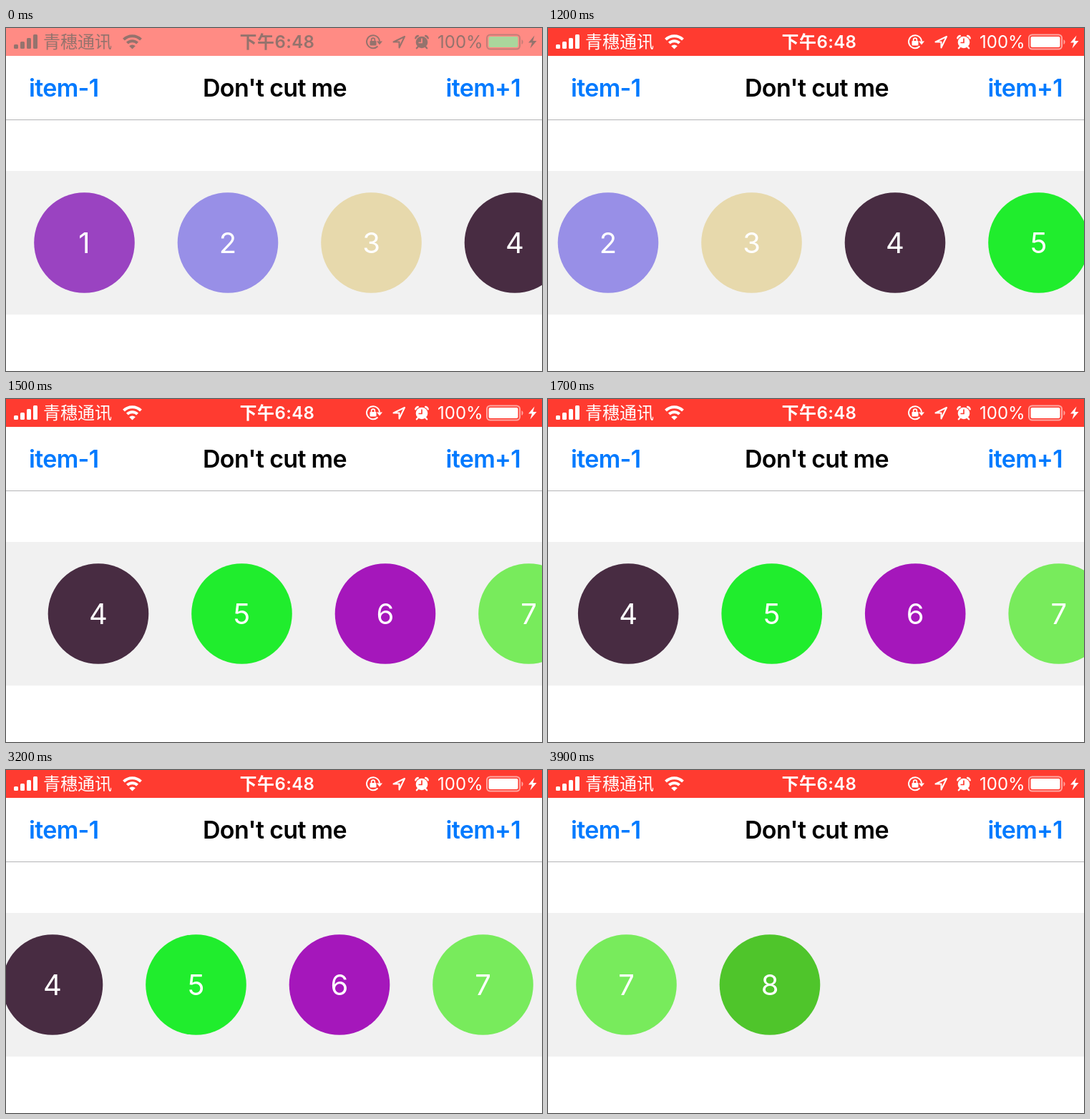
Animation of 749 by 480 pixels, one loop 4600 ms. Source, as an HTML page:

```html
<!DOCTYPE html>
<html lang="zh-CN">
<meta charset="utf-8">
<title>Paging list</title>
<style>
  html, body { margin: 0; width: 100%; height: 100%; overflow: hidden; background: #fff; }
  svg { display: block; width: 749px; height: 480px; font-family: Inter, "Noto Sans CJK SC", "Noto Sans CJK", sans-serif; }
  .bar { font-size: 24px; }
  .nav { font-size: 34px; font-weight: 600; letter-spacing: -.02em; }
  .line { fill: none; stroke: var(--ink); stroke-width: 2; }
  #status { fill: var(--ink); }
  #list text { font-size: 40px; fill: #fff; text-anchor: middle; }
</style>
<svg viewBox="0 0 749 480">
  <rect width="749" height="39" fill="var(--bar)"/>
  <g id="status">
    <!-- signal and carrier -->
    <rect x="11" y="23" width="6" height="6" rx="1.5"/>
    <rect x="20" y="19" width="6" height="10" rx="1.5"/>
    <rect x="29" y="14" width="6" height="15" rx="1.5"/>
    <rect x="38" y="9" width="6" height="20" rx="1.5"/>
    <text class="bar" x="52" y="28" font-weight="300">青穗通讯</text>
    <path class="line" style="stroke-width:4" d="M164.5 16.2A17 17 0 0 1 188.5 16.2M169.4 21.2A10 10 0 0 1 183.6 21.2"/>
    <path d="M176.5 29.5l-4.3-4.3a6.1 6.1 0 0 1 8.6 0z"/>
    <text class="bar" x="379" y="28" font-weight="600" text-anchor="middle" letter-spacing=".4">下午6:48</text>
    <!-- rotation lock -->
    <path class="line" d="M519.5 25.5A9 9 0 1 1 522 18.5"/>
    <path d="M518 18.5h8l-4 5z"/>
    <rect x="508.5" y="18" width="9" height="6.5" rx="1"/>
    <path class="line" style="stroke-width:1.6" d="M510.6 18.5v-2a2.4 2.4 0 0 1 4.8 0v2"/>
    <!-- location -->
    <path class="line" stroke-linejoin="round" d="M557 12L541.5 19.5H549.5V27.5z"/>
    <!-- alarm -->
    <circle cx="581" cy="20" r="8.3"/>
    <path class="line" style="stroke-width:2.4" stroke-linecap="round" d="M572.3 14.3Q573 11.7 575.8 11M589.7 14.3Q589 11.7 586.2 11M575.5 26.5l-1.6 1.8M586.5 26.5l1.6 1.8"/>
    <path class="line" style="stroke:var(--bar);stroke-width:1.7" d="M581 14.5V20.5H576.5"/>
    <text class="bar" x="603" y="28">100%</text>
    <!-- battery -->
    <rect class="line" x="672" y="9.5" width="46" height="20" rx="4.5" opacity=".55"/>
    <rect x="674.5" y="12" width="41" height="15" rx="2" fill="var(--charge)"/>
    <path d="M720.5 16a4 4 0 0 1 0 7z" opacity=".55"/>
    <path d="M738.5 10.5L730 20.5H735L732.5 28.5L741.5 18H736.3z"/>
  </g>
  <g class="nav">
    <text x="32" y="95.5" fill="#007aff">item-1</text>
    <text x="375.5" y="95.5" text-anchor="middle">Don't cut me</text>
    <text x="719" y="95.5" fill="#007aff" text-anchor="end">item+1</text>
  </g>
  <rect y="128" width="749" height="1" fill="#b4b4b6"/>
  <rect y="200" width="749" height="201" fill="#f1f1f1"/>
  <g id="list"></g>
</svg>
<script>
  const LOOP = 4600, STEP = 100, GAP = 200.5, PAGE = 3 * GAP;
  const colors = ['#9a43c1', '#988fe7', '#e7d9ac', '#482c42', '#20ed2d', '#a517bb', '#78eb5c', '#4fc52b'];
  const list = document.getElementById('list');
  const root = document.documentElement.style;

  list.innerHTML = colors.map((c, i) => {
    const x = 109.5 + i * GAP;
    return `<circle cx="${x}" cy="300.5" r="70.3" fill="${c}"/><text x="${x}" y="315">${i + 1}</text>`;
  }).join('');

  const mix = (a, b, k) => `rgb(${a.map((v, i) => Math.round(v + (b[i] - v) * k))})`;

  // Each swipe starts with `rest` px left to go, which shrinks by `decay` per step.
  function settle(t, start, end, rest, decay) {
    const n = (t - start) / STEP;
    return n < 7 ? end - rest * decay ** n : end;
  }

  function scrollAt(t) {
    if (t < 1200) return 0;
    if (t < 3200) return settle(t, 1200, PAGE, 375.5, .373);
    return settle(t, 3200, 2 * PAGE, 557, .386);
  }

  function draw(now) {
    const t = Math.floor(now % LOOP / STEP) * STEP;
    const fade = t < 100 ? 0 : t < 200 ? .85 : 1;
    const white = [255, 255, 255];
    root.setProperty('--bar', mix([255, 139, 132], [255, 59, 48], fade));
    root.setProperty('--ink', mix([148, 115, 109], white, fade));
    root.setProperty('--charge', mix([170, 214, 156], white, fade));
    list.setAttribute('transform', `translate(${-scrollAt(t).toFixed(2)} 0)`);
  }

  const begin = performance.now();
  function tick() {
    draw(performance.now() - begin);
    requestAnimationFrame(tick);
  }
  tick();
</script>
</html>
```
